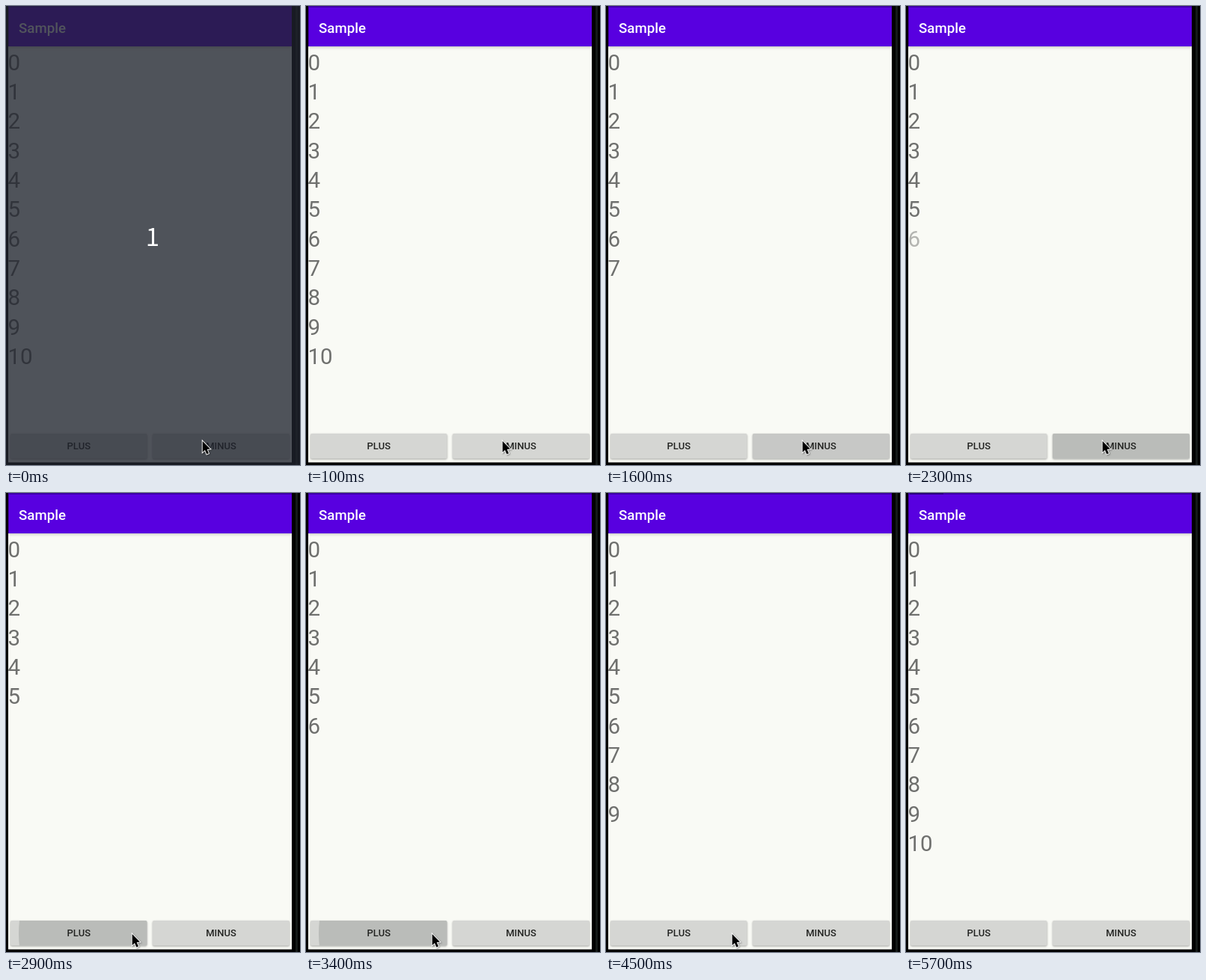
An HTML page with a canvas for the animation above (5.8 s loop, 393 px wide and 614 px high).

```html
<!DOCTYPE html>
<html lang="en">
<head>
<meta charset="utf-8">
<title>Sample</title>
<style>
html, body { margin: 0; width: 100%; height: 100%; overflow: hidden; background: #000; }
canvas { display: block; }
</style>
</head>
<body>
<canvas id="stage" width="393" height="614"></canvas>
<script>
const ctx = document.getElementById('stage').getContext('2d');
const LOOP = 5800, STEP = 100;
const FIRST = 6, LAST = 10; // rows that get removed and added again

const clamp = v => Math.min(1, Math.max(0, v));
const mix = (a, b, k) => a + (b - a) * k;

// touch(row): when the button is pressed to change that row
const minus = { label: 'MINUS', x: 196, w: 183, touchX: 262, touch: row => 500 + 400 * (LAST - row) };
const plusTouches = [2800, 3300, 3805, 4100, 4700];
const plus = { label: 'PLUS', x: 6, w: 182.5, touchX: 168, touch: row => plusTouches[row - FIRST] };

function box(color, x, y, w, h) {
  ctx.fillStyle = color;
  ctx.fillRect(x, y, w, h);
}

function text(str, x, y, font, color, align = 'left') {
  ctx.font = font;
  ctx.fillStyle = color;
  ctx.textAlign = align;
  ctx.fillText(str, x, y);
}

function shadow(color, blur, x, y) {
  ctx.shadowColor = color;
  ctx.shadowBlur = blur;
  ctx.shadowOffsetX = x;
  ctx.shadowOffsetY = y;
}

function drawFrame() {
  box('#000', 0, 0, 393, 614);
  box('#151a18', 387, 0, 3, 614);
  box('#f9faf5', 3, 0, 379, 610.5);
}

function drawBar(t) {
  ctx.save();
  ctx.beginPath();
  ctx.rect(3, 0, 379, 80);
  ctx.clip();
  shadow('rgba(0,0,0,.25)', 4, 0, 1);
  box('#5800e0', 3, 0, 379, 54);
  ctx.restore();
  box('#3d00a5', 3, 0, 379, 2);
  box('rgba(0,0,0,.25)', 3, 2, 1, 52);
  if (t >= 5700) box('#29007c', 5, 0, 45, 2);
  text('Sample', 17, 36, '500 18.7px Roboto, sans-serif', '#fff');
}

function drawList(t) {
  const done = (button, row) => clamp((t - button.touch(row) - 100) / 200);
  for (let row = 0; row <= LAST; row++) {
    ctx.globalAlpha = row < FIRST ? 1 : 1 - done(minus, row) + done(plus, row);
    text(row, 2.5, Math.floor(86 + row * 118 / 3), '29.5px Roboto, sans-serif', '#6f706e');
  }
  ctx.globalAlpha = 1;
}

function drawButton({ label, x, w, touchX, touch }, t) {
  ctx.save();
  ctx.beginPath();
  ctx.roundRect(x, 572, w, 33.5, 2);
  shadow('rgba(0,0,0,.35)', 2.5, 0, 1);
  ctx.fillStyle = '#d5d6d3';
  ctx.fill();
  ctx.shadowColor = 'transparent';
  ctx.clip();
  // The ripple spreads from the pointer, then fades
  for (let row = FIRST; row <= LAST; row++) {
    const age = t - touch(row);
    if (age < 0) continue;
    ctx.globalAlpha = clamp((400 - age) / 200);
    ctx.fillStyle = '#babcb9';
    ctx.beginPath();
    ctx.arc(touchX, 589, 1.51 * age, 0, 7);
    ctx.fill();
  }
  ctx.restore();
  text(label, x + w / 2, 593, '500 13px Roboto, sans-serif', '#222321', 'center');
}

function drawPointer(t) {
  let x = minus.touchX, y = 581;
  const glide = (toX, toY, from, to) => {
    const k = clamp((t - from) / (to - from));
    x = mix(x, toX, k);
    y = mix(y, toY, k);
  };
  glide(plus.touchX, 589, 2400, 2700);
  glide(30, 184, 4800, 5000);
  glide(-14, -40, 5100, 5400);

  ctx.save();
  ctx.translate(x, y);
  ctx.beginPath();
  [[.7, 1], [.7, 16], [4, 13], [6.3, 18.5], [9, 17.4], [6.7, 12], [11, 11.6]]
    .forEach(p => ctx.lineTo(...p));
  ctx.closePath();
  shadow('rgba(0,0,0,.35)', 2, 1, 1);
  ctx.lineWidth = 1.8;
  ctx.strokeStyle = '#fff';
  ctx.stroke();
  ctx.shadowColor = 'transparent';
  ctx.fillStyle = '#000';
  ctx.fill();
  ctx.restore();
}

function draw(t) {
  drawFrame();
  drawBar(t);
  drawList(t);
  drawButton(plus, t);
  drawButton(minus, t);
  if (t < 100) {
    box('rgba(31,35,46,.775)', 0, 0, 393, 614);
    text('1', 196, 321, '500 33px "Noto Sans CJK JP", "Noto Sans CJK", sans-serif', '#fff', 'center');
  }
  drawPointer(t);
}

const start = performance.now();
function tick() {
  const t = (performance.now() - start) % LOOP;
  draw(Math.floor(t / STEP) * STEP);
  requestAnimationFrame(tick);
}
tick();
</script>
</body>
</html>
```
